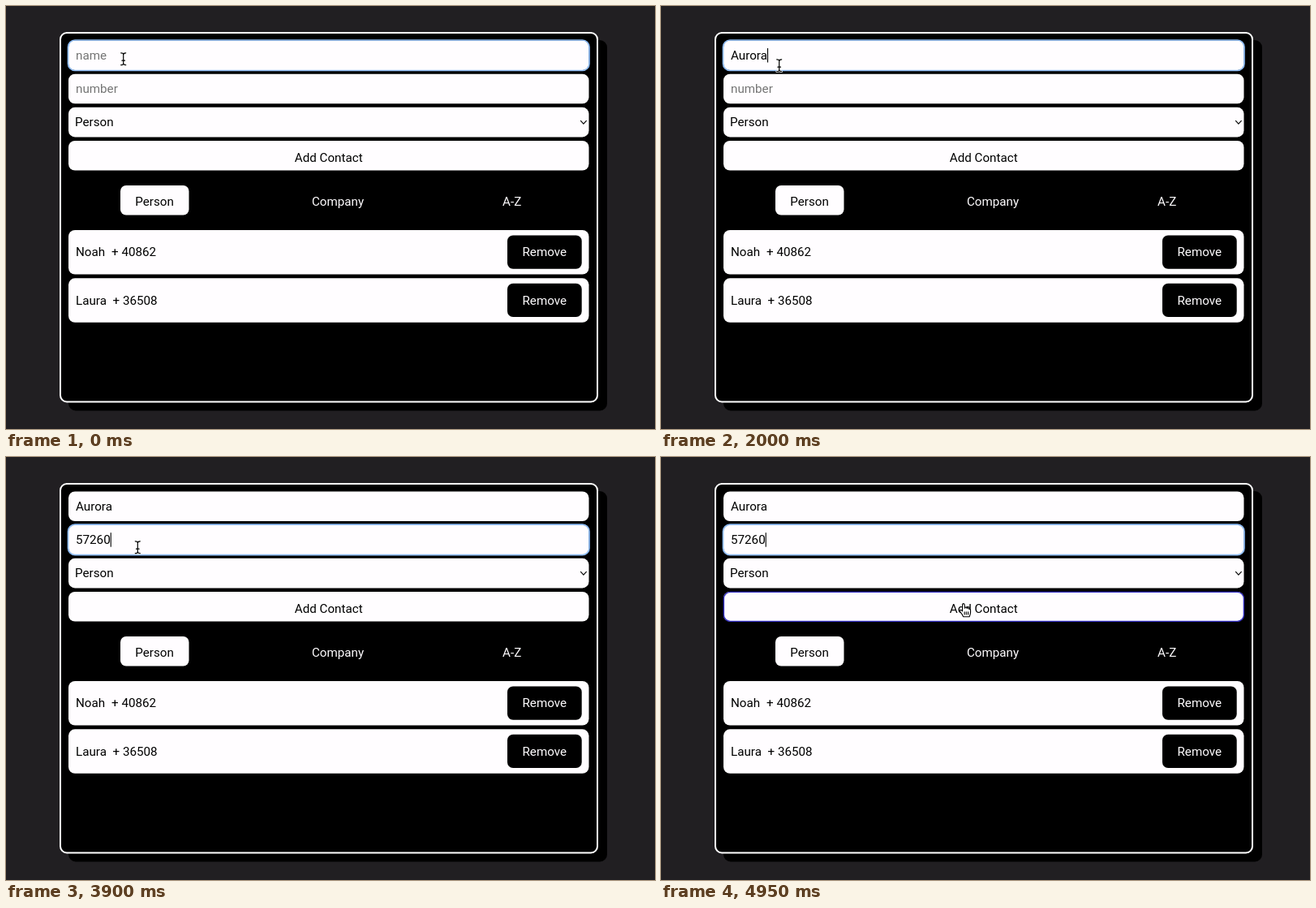
Write an HTML page that moves like this. It is 800 px wide and 521 px high and loops after 5 s.

```html
<!DOCTYPE html>
<html lang="en">
<head>
<meta charset="utf-8">
<title>Contacts</title>
<style>
  html, body { margin: 0; width: 100%; height: 100%; overflow: hidden; background: #211f22; }
  svg { display: block; width: 100%; height: 100%; }
  text { font: 15.2px Roboto, sans-serif; fill: #000; white-space: pre; }
  .light { fill: #fffdff; }
  .hint { fill: #757575; }
  .mid { text-anchor: middle; }
  .line { fill: none; stroke: #000; }
</style>
</head>
<body>
<svg id="stage" viewBox="0 0 800 521">
  <rect x="77" y="42" width="664" height="456.5" rx="9"/>
  <rect x="67" y="33" width="662" height="454.5" rx="8" stroke="#fff" stroke-width="2"/>
  <g id="page"></g>
  <rect id="ring" x="76.5" width="642.5" height="37.5" rx="8.5" fill="none" stroke="#8fbdf5" stroke-width="1.7"/>
  <rect id="hover" x="77.4" y="166.4" width="641" height="36" rx="8" fill="none" stroke="#3430c4" stroke-width="1.4"/>
  <path class="line" d="M708.2 141.2l3.7 3.9 3.7-3.9" stroke-width="1.2"/>
  <text id="name" x="86" y="66"></text>
  <text id="number" x="86" y="107"></text>
  <rect id="caret" width="1.1" height="17.5"/>
  <g id="mouse">
    <g id="beam" fill="none" stroke-linecap="round">
      <path d="M-3-7.2Q0-7.2 0-5Q0-7.2 3-7.2M0-5V5.5M-3 7.7Q0 7.7 0 5.5Q0 7.7 3 7.7M-1.8 2.2H1.8" stroke="#fff" stroke-width="2.6"/>
      <path d="M-3-7.2Q0-7.2 0-5Q0-7.2 3-7.2M0-5V5.5M-3 7.7Q0 7.7 0 5.5Q0 7.7 3 7.7M-1.8 2.2H1.8" stroke="#000" stroke-width="1.2"/>
    </g>
    <path id="arrow" d="M0 0V12.6L2.9 9.9L5 14.6L7.2 13.6L5.2 9H9Z" stroke="#fff" stroke-width=".8"/>
    <g id="hand" stroke="#000" stroke-width="1.1" stroke-linejoin="round" stroke-linecap="round">
      <path fill="#fff" d="M-3.2 2V-5.8Q-3.2-7.3-2-7.3Q-.7-7.3-.6-5.8L-.2-1.6Q.1-3 1.3-2.8Q2.3-2.6 2.4-1.4Q3-2.4 4-2Q4.9-1.6 4.9-.6Q6.8-1 6.8 1V3.5Q6.6 6 5.4 8.8H-2.2Q-3 6.4-6 2.8Q-7 1.2-5.8.6Q-4.6.2-3.2 2Z"/>
      <path d="M-.6 3V6M1.6 3V6M3.8 3V6"/>
    </g>
  </g>
</svg>
<script>
const $ = id => document.getElementById(id);
const LOOP = 5000, STEP = 50;

function add(tag, attrs, content = '') {
  const node = document.createElementNS('http://www.w3.org/2000/svg', tag);
  for (const key in attrs) node.setAttribute(key, attrs[key]);
  node.textContent = content;
  $('page').append(node);
}
const box = (x, y, width, height, cls = 'light', rx = 8) =>
  add('rect', { x, y, width, height, rx, class: cls });
const label = (x, y, content, cls = '') => add('text', { x, y, class: cls }, content);

[42.5, 83.7, 124.8, 166].forEach(y => box(77, y, 641.5, 36.6));
label(85, 148, 'Person');
label(397.7, 191.6, 'Add Contact', 'mid');

box(141, 221, 84.5, 36.5, 'light', 7);
label(183, 246.4, 'Person', 'mid');
label(409, 246.4, 'Company', 'mid light');
label(623.7, 246.4, 'A-Z', 'mid light');

[['Noah', '+ 40862', 130], ['Laura', '+ 36508', 131.5]].forEach(([name, number, x], i) => {
  const y = 276 + i * 59.3;
  box(77, y, 641.5, 54.5);
  label(86, y + 32.2, name);
  label(x, y + 32.2, number);
  box(618, y + 6.5, 91.7, 41.2, '', 7);
  label(663.8, y + 32.2, 'Remove', 'mid light');
});

const fields = [
  { id: 'name', hint: 'name', value: 'Aurora', keys: [750, 950, 1100, 1250, 1400, 1600] },
  { id: 'number', hint: 'number', value: '57260', keys: [3050, 3200, 3350, 3450, 3600] }
];
const FOCUS_NUMBER = 2400, HOVER = 4550;
const caretSpans = [[50, 550], [750, 2100], [2400, 2900], [3050, 4100], [4600, LOOP]];
const hiddenSpans = [[750, 1900], [3050, 3700]];

// time, x, y
const route = [
  [0, 144.7, 65], [1850, 144.7, 65], [2000, 145.7, 73], [2200, 145, 90], [2400, 143, 96.5],
  [3650, 143, 96.5], [3800, 152, 102], [3900, 162.3, 111], [3950, 182, 128], [4100, 226, 141],
  [4300, 275.3, 148.5], [4500, 338, 165], [4600, 359, 178], [4800, 374, 187.5], [LOOP, 375, 188]
];
const within = (spans, t) => spans.some(([from, to]) => t >= from && t < to);
const show = (id, on) => $(id).style.display = on ? '' : 'none';

function mouseAt(t) {
  const i = route.findIndex(point => point[0] > t);
  const [t0, x0, y0] = route[i - 1], [t1, x1, y1] = route[i];
  const k = (t - t0) / (t1 - t0);
  return [x0 + (x1 - x0) * k, y0 + (y1 - y0) * k];
}

function draw(t) {
  for (const { id, hint, value, keys } of fields) {
    const typed = value.slice(0, keys.filter(key => key <= t).length);
    $(id).textContent = typed || hint;
    $(id).setAttribute('class', typed ? '' : 'hint');
  }

  const active = t < FOCUS_NUMBER ? 0 : 1;
  const field = $(fields[active].id);
  const empty = field.classList.contains('hint');
  $('ring').setAttribute('y', 42 + active * 41.2);
  $('caret').setAttribute('x', 86 + (empty ? 0 : field.getComputedTextLength()));
  $('caret').setAttribute('y', 52 + active * 41.2);
  show('caret', within(caretSpans, t));

  const [x, y] = mouseAt(t);
  $('mouse').setAttribute('transform', `translate(${x} ${y})`);
  show('mouse', !within(hiddenSpans, t));
  show('beam', y < 121);
  show('arrow', y >= 121 && y < 166);
  show('hand', y >= 166);
  $('hover').style.opacity = Math.min(1, Math.max(0, (t - HOVER + STEP) / 250));
}

function tick() {
  draw(Math.floor(performance.now() % LOOP / STEP) * STEP);
  requestAnimationFrame(tick);
}
tick();
</script>
</body>
</html>
```
